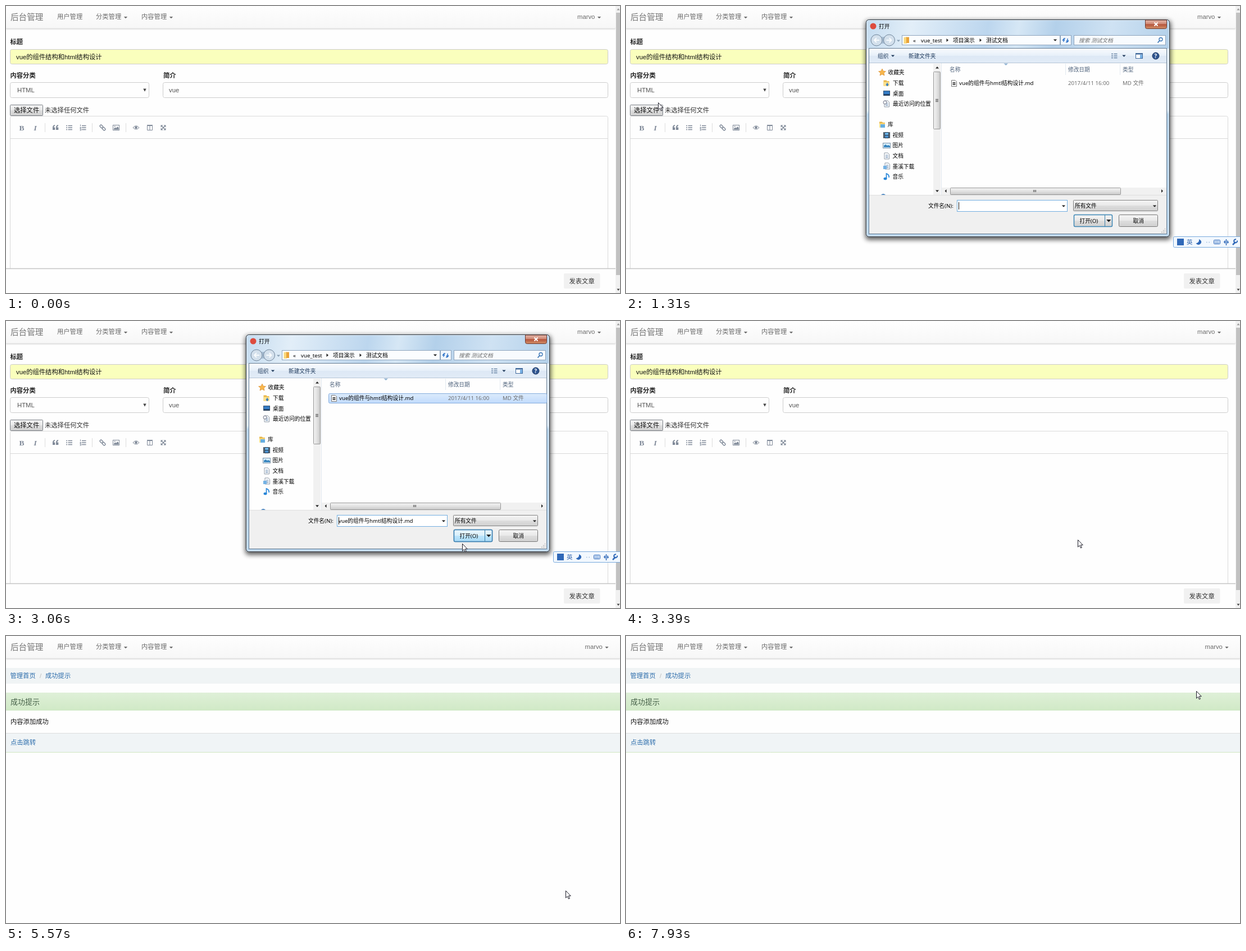
Write an HTML page that moves like this. It is 1093 by 512 pixels and loops after 8 s.

```html
<!DOCTYPE html>
<html lang="zh-CN">
<head>
<meta charset="utf-8">
<title>后台管理</title>
<style>
html, body { margin: 0; width: 100%; height: 100%; overflow: hidden; background: #fefefe; }
svg { display: block; width: 100vw; height: 100vh; }
text { font: 11.3px "Liberation Sans", "Noto Sans CJK SC", "Noto Sans CJK", sans-serif; fill: #333; white-space: pre; }
.nav, .nav text { fill: #6c6c6c; }
.nav .brand { font-size: 14.6px; fill: #777; }
.b { font-weight: 700; fill: #222; }
.k { fill: #111; }
.a { fill: #2b6cab; }
.g { fill: #555; }
.box { fill: #fefefe; stroke: #ccc; }
.dialog text { font-family: "Noto Sans", "Noto Sans CJK SC", "Noto Sans CJK", sans-serif; font-size: 9.7px; fill: #000; }
.dialog .head { fill: #4c607a; }
.dialog .dim { fill: #6d6d6d; }
.dialog .bar { fill: #1e395b; }
.line { fill: none; stroke: #7f8998; stroke-width: 1.4; }
.thin { stroke-width: 1; }
.solid { fill: #7f8998; }
.tick { fill: #222; }

.form, .done, .before, .after, .hover, .picked, .openHot, .sendHot { animation: 8s step-end infinite; }
.form { animation-name: form; }
.done { animation-name: done; }
.before { animation-name: before; }
.after { animation-name: after; }
.hover { animation-name: hover; }
.picked { animation-name: picked; }
.openHot { animation-name: openHot; }
.sendHot { animation-name: sendHot; }
.dialog { animation: dialog 8s linear infinite; }
.cursor { animation: move 8s linear infinite, show 8s step-end infinite; }

@keyframes form { 0% { opacity: 1 } 68.75%, 100% { opacity: 0 } }
@keyframes done { 0% { opacity: 0 } 68.75%, 100% { opacity: 1 } }
@keyframes before { 0% { opacity: 1 } 43.4%, 100% { opacity: 0 } }
@keyframes after { 0% { opacity: 0 } 43.4%, 100% { opacity: 1 } }
@keyframes hover { 0% { opacity: 0 } 23.6% { opacity: .5 } 27.2%, 100% { opacity: 1 } }
@keyframes picked { 0% { opacity: 0 } 27.2%, 100% { opacity: 1 } }
@keyframes openHot { 0% { opacity: 0 } 34.1%, 100% { opacity: 1 } }
@keyframes sendHot { 0% { opacity: 0 } 63%, 100% { opacity: 1 } }
@keyframes show { 0% { opacity: 0 } .87%, 100% { opacity: 1 } }
@keyframes dialog {
  0%, 13.6% { opacity: 0 }
  13.75% { opacity: .4 }
  15%, 40% { opacity: 1 }
  41.2%, 100% { opacity: 0 }
}
@keyframes move {
  0%, .87% { transform: translate(706px, 410px) }
  5.6% { transform: translate(300px, 232px) }
  8.4% { transform: translate(92px, 156px) }
  10.5%, 17.25% { transform: translate(57px, 172px); animation-timing-function: ease-in-out }
  23.6%, 24% { transform: translate(640px, 150px) }
  27%, 30% { transform: translate(670px, 140px); animation-timing-function: ease-in-out }
  34.1%, 35% { transform: translate(822px, 386px) }
  38.25%, 40% { transform: translate(812px, 397px) }
  41.5%, 43.2% { transform: translate(804px, 390px); animation-timing-function: ease-in-out }
  50% { transform: translate(406px, 303px) }
  51.9%, 53.3% { transform: translate(24px, 204px); animation-timing-function: ease-in-out }
  60%, 60.9% { transform: translate(1050px, 465px) }
  63.6%, 64.4% { transform: translate(1030px, 484px) }
  65.6% { transform: translate(1006px, 434px) }
  66.6%, 70.4% { transform: translate(996px, 454px) }
  72.5%, 73.5% { transform: translate(347px, 242px); animation-timing-function: ease-in-out }
  81.25%, 82.3% { transform: translate(1058px, 62px) }
  85% { transform: translate(958px, 46px) }
  87.5% { transform: translate(1022px, 8px) }
  90% { transform: translate(1074px, 24px) }
  92.9%, 93.4% { transform: translate(1046px, 54px) }
  95.1%, 96% { transform: translate(1052px, 60px) }
  99.1%, 100% { transform: translate(1015px, 98px) }
}
</style>
</head>
<body>
<svg viewBox="0 0 1093 512">
<defs>
  <linearGradient id="navFill" x2="0" y2="1"><stop stop-color="#fefefe"/><stop offset="1" stop-color="#f7f7f7"/></linearGradient>
  <linearGradient id="green" x2="0" y2="1"><stop stop-color="#dff0d8"/><stop offset="1" stop-color="#d0e9c6"/></linearGradient>
  <linearGradient id="button" x2="0" y2="1"><stop stop-color="#f4f4f4"/><stop offset=".5" stop-color="#e9e9e9"/><stop offset=".5" stop-color="#dedede"/><stop offset="1" stop-color="#d0d0d0"/></linearGradient>
  <linearGradient id="blue" x2="0" y2="1"><stop stop-color="#eaf6fd"/><stop offset=".5" stop-color="#d9f0fc"/><stop offset=".5" stop-color="#bee6fd"/><stop offset="1" stop-color="#a7d9f5"/></linearGradient>
  <linearGradient id="glass" x2="1" y2=".12"><stop stop-color="#c5dcf0"/><stop offset=".15" stop-color="#e2eef8"/><stop offset=".4" stop-color="#bcd6ee"/><stop offset=".5" stop-color="#d6e7f5"/><stop offset=".62" stop-color="#b3d0ea"/><stop offset=".8" stop-color="#cfe2f3"/><stop offset="1" stop-color="#b4d1ea"/></linearGradient>
  <linearGradient id="side" x2="0" y2="1"><stop stop-color="#e6f0f9"/><stop offset=".33" stop-color="#dce9f5"/><stop offset=".35" stop-color="#b3d0e8"/><stop offset="1" stop-color="#b9d5ec"/></linearGradient>
  <linearGradient id="tool" x2="0" y2="1"><stop stop-color="#f9fbfe"/><stop offset=".5" stop-color="#e6eff9"/><stop offset=".5" stop-color="#dde8f5"/><stop offset="1" stop-color="#e2ecf7"/></linearGradient>
  <linearGradient id="close" x2="0" y2="1"><stop stop-color="#e3b5a8"/><stop offset=".45" stop-color="#d08a76"/><stop offset=".5" stop-color="#b4533b"/><stop offset="1" stop-color="#d29068"/></linearGradient>
  <linearGradient id="row" x2="0" y2="1"><stop stop-color="#dcebfc"/><stop offset="1" stop-color="#c1dbfc"/></linearGradient>
  <linearGradient id="thumb" x2="1" y2="0"><stop stop-color="#f3f3f3"/><stop offset=".5" stop-color="#e2e2e2"/><stop offset="1" stop-color="#c8c8c8"/></linearGradient>
  <linearGradient id="thumbH" x2="0" y2="1"><stop stop-color="#f3f3f3"/><stop offset=".5" stop-color="#e2e2e2"/><stop offset="1" stop-color="#c8c8c8"/></linearGradient>
  <filter id="shade" x="-5%" y="-5%" width="110%" height="112%"><feGaussianBlur stdDeviation="4.5"/></filter>
  <filter id="soft" x="-1%" y="-50%" width="102%" height="250%" color-interpolation-filters="sRGB"><feGaussianBlur stdDeviation="1.5"/></filter>
  <path id="down" d="M-3.2-1.6H3.2L0 1.8z"/>
  <path id="right" d="M-1.5-3V3L2 0z"/>
  <g id="menu" class="nav">
    <text class="brand" x="8" y="24.5">后台管理</text>
    <text x="91" y="23.3">用户管理</text>
    <text x="160" y="23.3">分类管理</text><use href="#down" x="213" y="20.5"/>
    <text x="241" y="23.3">内容管理</text><use href="#down" x="294" y="20.5"/>
  </g>
  <g id="user" class="nav"><text x="1017" y="23.3">marvo</text><use href="#down" x="1056" y="20.5"/></g>
  <g id="folder"><path d="M-5-5H0L1-3.5H5V5H-5z" fill="#e8b648"/><path d="M-5-2H5V5H-5z" fill="#fbe08d"/></g>
  <g id="sheet"><path d="M-4-5.5H2L4.5-3V5.5H-4z" fill="#fff" stroke="#8b97a5"/><path d="M-2-1.5H2.5M-2 .8H2.5M-2 3H2.5" stroke="#6e8fb4"/></g>
</defs>

<rect width="1093" height="512" fill="#fefefe"/>

<g class="form">
  <rect y="1" width="1085" height="40" fill="#ccc" filter="url(#soft)"/>
  <path d="M0 0H1085V37Q1085 40 1082 40H0z" fill="url(#navFill)"/>
  <path d="M0 40H1082" stroke="#e2e2e2"/>
  <use href="#menu"/><use href="#user"/>

  <text class="b" x="7.5" y="68.2">标题</text>
  <rect x="7.5" y="77.5" width="1064" height="26" rx="3" fill="#faffbd" stroke="#ccc"/>
  <text class="k" x="18" y="95.2">vue的组件结构和html结构设计</text>
  <text class="b" x="7.5" y="128.2">内容分类</text>
  <text class="b" x="280" y="128.2">简介</text>
  <rect class="box" x="7.5" y="136.5" width="247" height="27" rx="3"/>
  <text class="g" x="20" y="154.2">HTML</text>
  <path d="M244.3 147.5h5.4l-2.7 5.2z" fill="#444"/>
  <rect class="box" x="279.5" y="136.5" width="792" height="27" rx="3"/>
  <text class="g" x="290" y="154.2">vue</text>

  <rect x="7.5" y="176.5" width="58" height="19" rx="1" fill="url(#button)" stroke="#7a7f86"/>
  <text class="k" x="14" y="190.2">选择文件</text>
  <text class="before" x="69" y="190.2">未选择任何文件</text>
  <text class="after" x="69" y="190.2">vue的组件与hmtl结构设计.md</text>

  <path d="M7.5 480V199.5Q7.5 196.5 10.5 196.5H1068.5Q1071.5 196.5 1071.5 199.5V480M7.5 236.5H1071.5" fill="none" stroke="#d9d9d9"/>
  <path d="M69.5 209V225M153.5 209V225M213.5 209V225" stroke="#ddd"/>
  <text x="23.5" y="221.5" style="font:700 13.5px 'Liberation Serif',serif;fill:#7f8998">B</text>
  <text x="49.5" y="221.5" style="font:italic 700 13.5px 'Liberation Serif',serif;fill:#7f8998">I</text>
  <path class="solid" d="M83 217Q83 212.5 87 212V213.8Q85 214.5 85 216.5H87.3V221H83zM89 217Q89 212.5 93 212V213.8Q91 214.5 91 216.5H93.3V221H89z"/>
  <path class="line" d="M107 213.5h2M107 217h2M107 220.5h2M110.5 213.5H118M110.5 217H118M110.5 220.5H118"/>
  <path class="line" d="M135 213.5H142.5M135 217H142.5M135 220.5H142.5"/>
  <path class="line thin" d="M132.5 211.5v3M131.5 216.5h2v1.5h-2M131.5 219.5h2v2.5h-2"/>
  <g class="line" transform="translate(172 217) rotate(45)"><rect x="-6" y="-2" width="6" height="4" rx="2"/><rect y="-2" width="6" height="4" rx="2"/></g>
  <rect class="line thin" x="190.5" y="212.5" width="11" height="9"/>
  <path class="solid" d="M192 220.5V218.5L194.5 216.5 196 218 198.5 215 200.5 217.5V220.5z"/><circle class="solid" cx="193.7" cy="214.7" r="1"/>
  <path class="line thin" d="M226 217Q231.5 210.5 237 217Q231.5 223 226 217z"/><circle class="solid" cx="231.5" cy="216.7" r="2.3"/>
  <path class="line thin" d="M251.5 213.5H260.5V221.5H251.5zM251 212.5H261M256 213V221"/>
  <path class="line" d="M277 214L283 220M283 214L277 220"/>
  <path class="solid" d="M275.5 212.5h4l-4 4zM284.5 212.5v4l-4-4zM275.5 221.5v-4l4 4zM284.5 221.5h-4l4-4z"/>

  <rect y="468" width="1085" height="44" fill="#fefefe"/>
  <path d="M0 468.5H1085" stroke="#c4c4c4" stroke-width="1.6"/>
  <rect x="993" y="477" width="64.5" height="27" rx="2" fill="#f1f1f1"/>
  <rect class="sendHot" x="993" y="477" width="64.5" height="27" rx="2" fill="#e4e4e4"/>
  <text x="1002.5" y="495.2">发表文章</text>

  <rect x="1085" width="8" height="512" fill="#f1f1f1"/>
  <rect x="1086" y="12" width="7" height="468" fill="#c1c1c1"/>
  <path d="M1087.5 7.5h5l-2.5-3.5z" fill="#999"/><path d="M1087.5 504.5h5l-2.5 3.5z" fill="#444"/>
</g>

<g class="done">
  <rect y="1" width="1093" height="40" fill="#ccc" filter="url(#soft)"/>
  <rect width="1093" height="40" fill="url(#navFill)"/>
  <path d="M0 40H1093" stroke="#e2e2e2"/>
  <use href="#menu"/><use href="#user" x="13.5"/>
  <rect y="57" width="1093" height="28" fill="#f0f4f5"/>
  <text class="a" x="7.5" y="75.2">管理首页</text><text x="60" y="75.2" style="fill:#bbb">/</text><text class="a" x="70" y="75.2">成功提示</text>
  <rect y="101" width="1093" height="32" fill="url(#green)"/>
  <text x="8" y="122" style="font-size:13px;fill:#456048">成功提示</text>
  <text x="8" y="157.2" class="k">内容添加成功</text>
  <rect y="173" width="1093" height="34" fill="#f0f4f6"/>
  <path d="M0 173.5H1093" stroke="#ddd"/><path d="M0 207.5H1093" stroke="#d0e6c2"/>
  <text class="a" x="8" y="194.2">点击跳转</text>
</g>

<g class="dialog">
  <rect x="426" y="26" width="544" height="391" rx="6" opacity=".65" filter="url(#shade)"/>
  <rect x="427.5" y="24.5" width="540" height="387" rx="5" fill="url(#glass)"/>
  <path d="M428 76H433V406H962V76H967V411H428z" fill="url(#side)"/>
  <rect x="428.5" y="25.5" width="538" height="385" rx="4" fill="none" stroke="#f2f8fd" opacity=".8"/>
  <rect x="427.5" y="24.5" width="540" height="387" rx="5" fill="none" stroke="#26323e"/>
  <circle cx="440" cy="36" r="5.5" fill="#dd4b3e"/>
  <text x="450" y="39.6">打开</text>
  <path d="M924.5 25V37.5Q924.5 40.5 927.5 40.5H959.5Q962.5 40.5 962.5 37.5V25z" fill="url(#close)" stroke="#6d3a30"/>
  <path d="M940.5 29.5L946.5 35.5M946.5 29.5L940.5 35.5" stroke="#fff" stroke-width="2"/>

  <rect x="440" y="55" width="36" height="12" rx="6" fill="#a9bfd4"/>
  <g fill="#d3e0ec" stroke="#6f849a"><circle cx="446" cy="61" r="10"/><circle cx="468.5" cy="61" r="10"/></g>
  <path d="M451 61H442M446 57L442 61 446 65M463.5 61H472.5M468.5 57L472.5 61 468.5 65" fill="none" stroke="#f8fbfd" stroke-width="2"/>
  <use href="#down" x="485" y="62" fill="#8aa0b5"/>
  <rect x="491.5" y="52.5" width="281" height="17" fill="#fbfdff" stroke="#8fa5bd"/>
  <rect x="773.5" y="52.5" width="19" height="17" fill="#f0f6fc" stroke="#8fa5bd"/>
  <path d="M494.5 56L500 55V67H494.5z" fill="#f9d77c"/><path d="M499 55.5H504V66H499z" fill="#e9a33a"/>
  <text x="511" y="64.6" font-weight="700">«</text><text x="525" y="64.6">vue_test</text><text x="582" y="64.6">项目演示</text><text x="641" y="64.6">测试文档</text>
  <g class="tick"><use href="#right" x="572" y="61"/><use href="#right" x="631" y="61"/><use href="#down" x="764" y="61"/></g>
  <path d="M779 64V59.5M777 61.5L779 59 781 61.5M786 58V63M784 61.5L786 64 788 61.5M779 58h3M783 64.5h3" fill="none" stroke="#2f74c8" stroke-width="1.4"/>
  <rect x="797.5" y="52.5" width="163" height="17" fill="#f8fbfe" stroke="#8fa5bd"/>
  <text class="dim" x="806" y="64.6" style="font-style:italic">搜索 测试文档</text>
  <circle cx="952" cy="59.5" r="3" fill="none" stroke="#3975b5" stroke-width="1.3"/><path d="M949.7 62L946.5 65.5" stroke="#3975b5" stroke-width="1.8"/>

  <rect x="432.5" y="75.5" width="530" height="331" fill="#fefefe" stroke="#687d92"/>
  <rect x="433" y="76" width="529" height="26" fill="url(#tool)"/><path d="M433 101.5H962" stroke="#b4c4d6"/>
  <text class="bar" x="448" y="92.6">组织</text><use href="#down" x="475" y="89" fill="#1e395b"/>
  <text class="bar" x="503" y="92.6">新建文件夹</text>
  <path d="M864 85.5h3M864 89h3M864 92.5h3M868.5 85.5h6M868.5 89h6M868.5 92.5h6" stroke="#6783a4" stroke-width="1.5"/>
  <use href="#down" x="886.5" y="89" fill="#1e395b"/>
  <rect x="907.5" y="84.5" width="12" height="9" fill="#fff" stroke="#40699b"/><path d="M907 85.5h13" stroke="#40699b" stroke-width="2"/><rect x="915" y="87" width="4" height="6" fill="#77b0e5"/>
  <circle cx="943" cy="89" r="6" fill="#2f5590" stroke="#1b3560"/><text x="940.6" y="92.5" style="fill:#fff;font-weight:700">?</text>

  <path d="M561.5 102V337" stroke="#e0e6ee"/>
  <path d="M782.5 103V123M879.5 103V123" stroke="#e2e8f0"/>
  <path d="M672.5 102.500h7.500l-3.7 3.500z" fill="#8fb2d2"/>
  <text class="head" x="576" y="116.6">名称</text><text class="head" x="787" y="116.6">修改日期</text><text class="head" x="884" y="116.6">类型</text>
  <rect class="hover" x="574.5" y="129.5" width="388" height="17" rx="2" fill="url(#row)" stroke="#84acdd"/>
  <path d="M579.5 132.5h6.5l2.5 2.5V143.5h-9z" fill="#fff" stroke="#777"/><path d="M581.5 136h5v5h-5z" fill="#555"/><path d="M581 138.5h6" stroke="#ccc"/>
  <text x="593" y="141.4">vue的组件与hmtl结构设计.md</text>
  <text class="dim" x="787" y="141.4">2017/4/11 16:00</text><text class="dim" x="884" y="141.4">MD 文件</text>

  <path d="M456 112l1.9 4.1 4.5.5-3.4 3 1 4.4-4-2.2-4 2.2 1-4.4-3.4-3 4.5-.5z" fill="#f8b64c" stroke="#d88b2a" stroke-width=".7"/>
  <text x="466.5" y="122.4">收藏夹</text>
  <use href="#folder" x="463.5" y="137.5"/><path d="M465 137v4M463 139.5l2 2.5 2-2.5" fill="none" stroke="#2475c8" stroke-width="1.5"/>
  <text x="475" y="141">下载</text>
  <rect x="458.5" y="151.5" width="11" height="8" fill="#347bc4" stroke="#35516f"/><path d="M459 158.5h10" stroke="#1c304a" stroke-width="2"/>
  <text x="475" y="159.6">桌面</text>
  <use href="#sheet" x="464" y="174.5"/><circle cx="461" cy="172" r="3" fill="#eef3f8" stroke="#778"/>
  <text x="475" y="178">最近访问的位置</text>
  <use href="#folder" x="456" y="211.5"/><rect x="453" y="211" width="8" height="6" fill="#67aee0"/>
  <text x="466" y="215.4">库</text>
  <rect x="458" y="225" width="12" height="11" fill="#26384a"/><rect x="461" y="226" width="6" height="4" fill="#6eb5e8"/><rect x="461" y="231" width="6" height="4" fill="#4a8ecb"/><path d="M459.5 225v11M468.5 225v11" stroke="#ddd" stroke-dasharray="1 1"/>
  <text x="474.5" y="233.8">视频</text>
  <rect x="457.5" y="244.5" width="13" height="9" fill="#d9efff" stroke="#7c91a5"/><path d="M459 252v-3l3-2 3 2 2-1 3 2v2z" fill="#3784bd"/>
  <text x="474.5" y="252.4">图片</text>
  <use href="#sheet" x="464" y="267.5"/><text x="474.5" y="271">文档</text>
  <use href="#sheet" x="465" y="285.5"/><rect x="458" y="285" width="6" height="6" fill="#74b2e4"/><text x="474.5" y="289.6">墨溪下载</text>
  <path d="M463.5 308V299Q469 301 468 306" fill="none" stroke="#2886d8" stroke-width="1.7"/><ellipse cx="461.5" cy="308" rx="3" ry="2.3" fill="#2886d8"/><text x="474.5" y="308">音乐</text>
  <path d="M454 337q4-4 8 0z" fill="#4c87c2"/>

  <rect x="547" y="103" width="13" height="234" fill="#f1f1f1"/><rect x="547.5" y="117.5" width="12" height="102" rx="1" fill="url(#thumb)" stroke="#979797"/>
  <path d="M551 166.5h5M551 168.5h5M551 170.5h5" stroke="#555"/>
  <path d="M551 111.5h6l-3-3.5zM551 328.5h6l-3 3.5z" class="tick"/>
  <rect x="562" y="324" width="400" height="13" fill="#f1f1f1"/><rect x="577.5" y="324.5" width="303" height="12" rx="1" fill="url(#thumbH)" stroke="#979797"/>
  <path d="M725.5 328v4M727.5 328v4M729.5 328v4" stroke="#555"/>
  <path d="M570.5 327v6l-3-3zM953 327v6l3-3z" class="tick"/>

  <rect x="433" y="337" width="529" height="69" fill="#f0f0f0"/><path d="M433 337.5H962" stroke="#dfdfdf"/>
  <text x="538" y="360">文件名(N):</text>
  <rect x="589.5" y="346.5" width="196" height="20" fill="#fff" stroke="#73aee0"/>
  <path d="M592.5 350V363" stroke="#111"/>
  <text class="picked" x="592" y="360">vue的组件与hmtl结构设计.md</text>
  <use href="#down" class="tick" x="779" y="357"/>
  <rect x="796.5" y="346.5" width="150" height="19" rx="1" fill="url(#button)" stroke="#838383"/><text x="799" y="360">所有文件</text><use href="#down" class="tick" x="941" y="357"/>
  <rect x="797.5" y="372.5" width="68" height="21" rx="2" fill="url(#button)" stroke="#3c86b5" stroke-width="1.5"/>
  <rect class="openHot" x="797.5" y="372.5" width="68" height="21" rx="2" fill="url(#blue)" stroke="#3c7fb1" stroke-width="1.5"/>
  <path d="M852.5 373V393" stroke="#3c7fa8"/><path d="M855 381h8.5l-4.2 4.5z" class="tick"/>
  <text x="807.5" y="386.6">打开(O)</text>
  <rect x="877.5" y="372.5" width="69" height="21" rx="2" fill="url(#button)" stroke="#777"/><text x="902.5" y="386.6">取消</text>
  <path d="M953 403.5h7M956 400.5h4M959 397.5h1" stroke="#aaa" stroke-width="1.5" stroke-dasharray="1.5 1.5"/>

  <rect x="974.5" y="411.5" width="122" height="19" rx="2" fill="#f2f8fe" stroke="#78a9dc"/>
  <rect x="981" y="415" width="12" height="12" fill="#2f68b8"/>
  <text x="998" y="424.8" style="fill:#255ba8;font-size:10.5px">英</text>
  <path d="M1020 416q1 6-5.5 7.5q4 4.5 8.5.5q3.5-5-3-8z" fill="#2f68b8"/>
  <path d="M1033 421.5h1.5M1037.5 421.5h1.5" stroke="#9cb9dc" stroke-width="1.5"/>
  <rect x="1046.5" y="417.5" width="11" height="7" rx="1" fill="#dceafa" stroke="#2f68b8"/><path d="M1048 420h8M1048 422.5h8" stroke="#2f68b8" stroke-dasharray="1.3 .7"/>
  <path d="M1068.5 416v11M1064 421h3M1066 418.5v5M1070 421.5h3M1071 418.5v5" stroke="#2f68b8" stroke-width="1.5"/>
  <path d="M1080 426l5-5" stroke="#2f68b8" stroke-width="2.5"/><path d="M1088 418.5a3 3 0 1 1-2-2" fill="none" stroke="#2f68b8" stroke-width="2"/>
</g>

<path class="cursor" d="M.5.5V13.2L3.4 10.4 5.4 15 7.4 14.2 5.4 9.7H9.3z" fill="#fff" stroke="#1c1c28" stroke-linejoin="round"/>
</svg>
</body>
</html>
```
